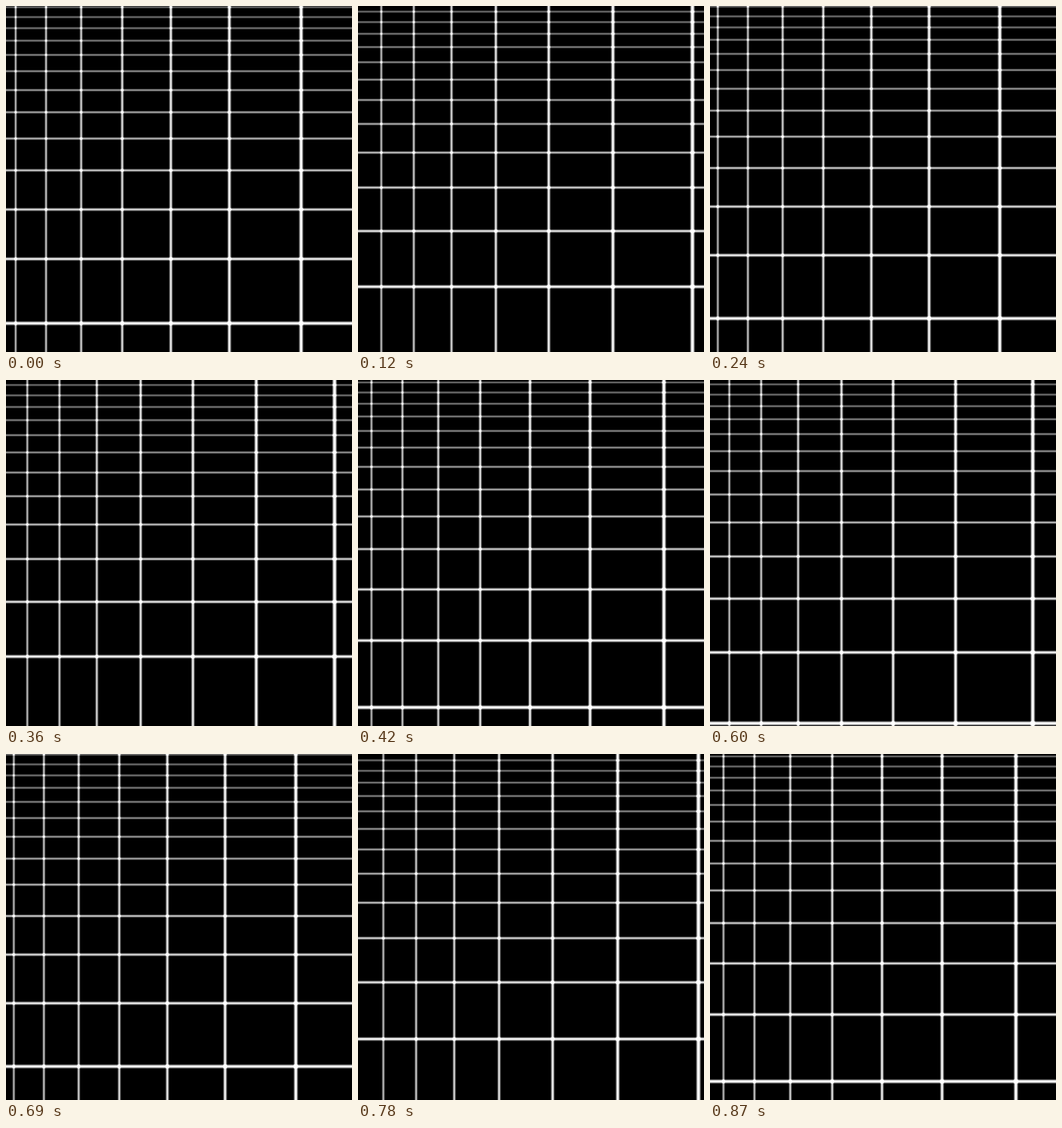
An HTML page with a canvas that plays this animation: 500x500 px, repeating every 0.9 s.

```html
<!DOCTYPE html>
<html lang="en">
<head>
<meta charset="utf-8">
<title>Receding grid</title>
<style>
  html, body { margin: 0; width: 100%; height: 100%; overflow: hidden; background: #000; }
  canvas { display: block; width: 500px; height: 500px; }
</style>
</head>
<body>
<canvas id="stage" width="500" height="500"></canvas>
<script>
const SIZE = 500;
const LOOP = 900;
const STEP = 30;
const CYCLE = 225;       // time for a line to recede by one cell
const THICKNESS = 0.034; // line width in cells
const MIN_WIDTH = 0.55;
const BLUR_STEP = 0.7;
const BLUR_TAPS = 2;     // extra bands on each side of a line

// Perspective per axis: position = origin + scale / depth
const columns = { origin: -593.9, scale: 9022, depth: 8.842 };
const rows = { origin: -250.3, scale: 4692.6, depth: 6.62 };

const ctx = document.getElementById('stage').getContext('2d');

function drawSoftLine(position, width, fillBand) {
  const reach = BLUR_TAPS + 1;
  for (let tap = -BLUR_TAPS; tap <= BLUR_TAPS; tap++) {
    ctx.globalAlpha = (reach - Math.abs(tap)) / reach ** 2;
    fillBand(position + tap * BLUR_STEP - width / 2, width);
  }
  ctx.globalAlpha = 1;
}

function drawLines(axis, shift, fillBand) {
  const nearest = axis.scale / (SIZE + 10 - axis.origin);
  const start = axis.depth + shift;
  let depth = start - Math.floor(start - nearest);
  for (;; depth++) {
    const position = axis.origin + axis.scale / depth;
    if (position < -5) break;
    const width = MIN_WIDTH + THICKNESS * axis.scale / depth ** 2;
    drawSoftLine(position, width, fillBand);
  }
}

function draw(time) {
  const shift = time / CYCLE;
  ctx.globalCompositeOperation = 'source-over';
  ctx.fillStyle = '#000';
  ctx.fillRect(0, 0, SIZE, SIZE);
  ctx.globalCompositeOperation = 'lighter';
  ctx.fillStyle = '#fff';
  drawLines(columns, shift, (x, width) => ctx.fillRect(x, 0, width, SIZE));
  drawLines(rows, shift, (y, height) => ctx.fillRect(0, y, SIZE, height));
}

const began = performance.now();

function tick() {
  const elapsed = (performance.now() - began) % LOOP;
  draw(Math.floor(elapsed / STEP + 0.001) * STEP);
  requestAnimationFrame(tick);
}

tick();
</script>
</body>
</html>
```
